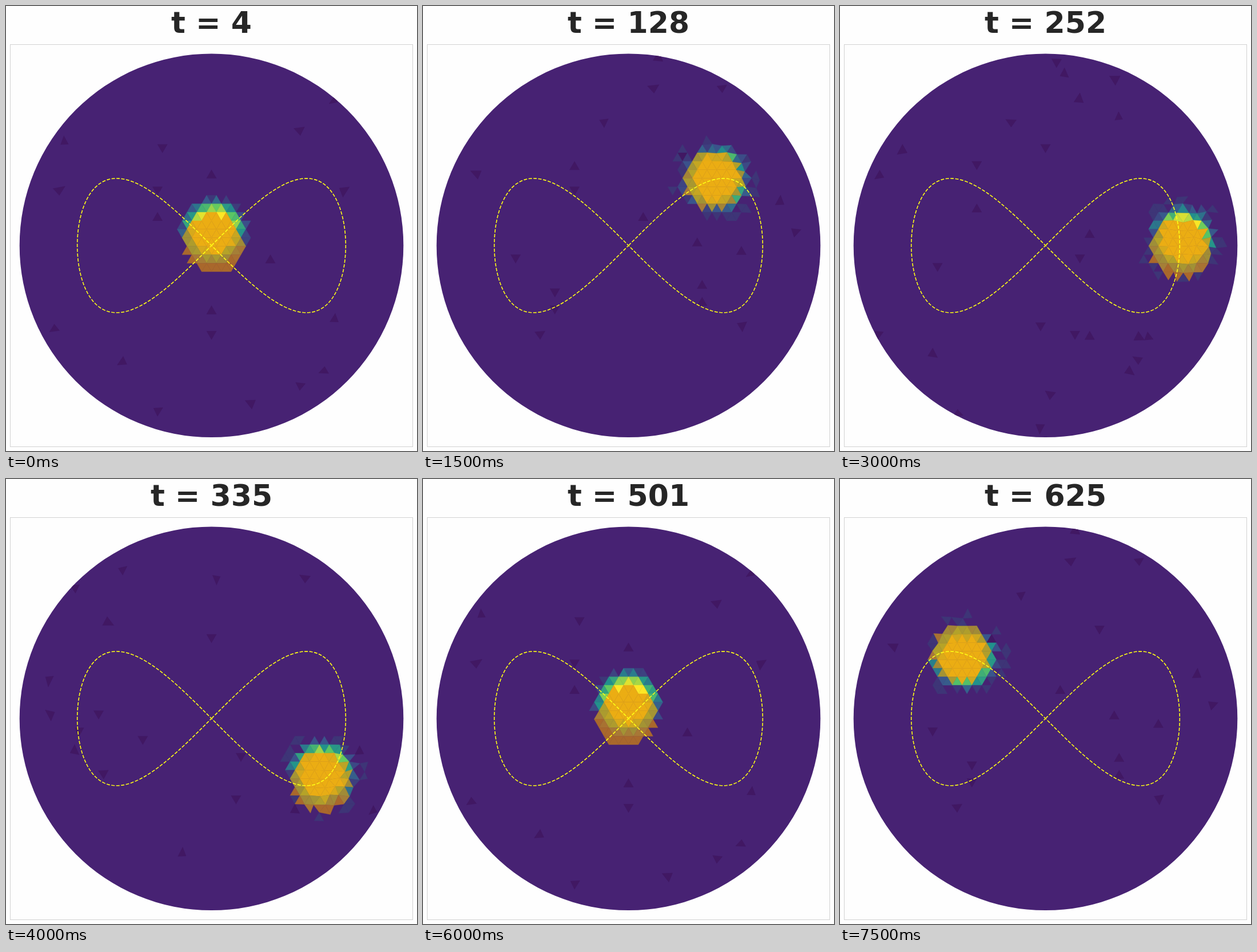
Recreate the animation shown at these times as an HTML page with a canvas. Size 719 by 779 pixels, loop 8 s.

```html
<!DOCTYPE html>
<html lang="en">
<head>
<meta charset="utf-8">
<title>Field on a disc</title>
<style>
  html, body { margin: 0; width: 100%; height: 100%; overflow: hidden; background: #fefefe; }
  canvas { position: absolute; left: 0; top: 0; }
  #label {
    position: absolute; left: 0; top: 3px; width: 719px; text-align: center;
    font: bold 52px/52px "DejaVu Sans", sans-serif; color: #262626; white-space: pre;
  }
</style>
</head>
<body>
<canvas id="stage" width="719" height="779"></canvas>
<div id="label"></div>
<script>
const ctx = document.getElementById("stage").getContext("2d");
const label = document.getElementById("label");

const CX = 359.5, CY = 419.3, RADIUS = 335.8;
const SIDE = 17.17, ROW = 14.86;
const STEP = 500, COUNT = 16, LAP = 994, REPEAT = 12;
const BASE = 0.1, DARK = 0.07, FAINT = 0.16;
const COVER = [226, 142, 10], COVER_ALPHA = 0.65, COVER_R = 51;
const VIRIDIS = [
  [68, 1, 84], [59, 82, 139], [33, 145, 140], [94, 201, 98], [253, 231, 37]
];

// Error of the estimated bump: step, dx, dy
const DRIFT = [
  [0, 1, -22], [3, 5, -2], [6, 5, -16], [8, 1, -13], [10, -4, 26], [12, 1, -25], [15, 4, 8]
];

function rand(a, b, c) {
  const s = Math.sin(a * 12.9898 + b * 78.233 + c * 37.719) * 43758.5453;
  return s - Math.floor(s);
}

function vertex(i, j) {
  const x = CX + SIDE * (i + (j & 1 ? 0 : 0.5));
  const y = 420.5 + ROW * j;
  const wobble = 5 * Math.min(1, Math.max(0, (Math.hypot(x - CX, y - CY) - 205) / 40));
  return [x + wobble * (rand(i, j, 1) - 0.5), y + wobble * (rand(i, j, 2) - 0.3)];
}

function cell(...pts) {
  const mean = m => (pts[0][m] + pts[1][m] + pts[2][m]) / 3;
  return { pts, x: mean(0), y: mean(1) };
}

function buildMesh() {
  const cells = [];
  for (let j = -24; j < 24; j++) {
    const o = j & 1 ? 0 : 1;
    for (let i = -21; i < 21; i++) {
      cells.push(cell(vertex(i, j), vertex(i + 1, j), vertex(i + o, j + 1)));
      cells.push(cell(vertex(i, j), vertex(i + o - 1, j + 1), vertex(i + o, j + 1)));
    }
  }
  return cells.filter(c => Math.hypot(c.x - CX, c.y - CY) < RADIUS);
}

const mesh = buildMesh();

function curve(a) {
  return [CX + 234.8 * Math.sin(a), CY - 117.5 * Math.sin(2 * a)];
}

function tick(k) {
  return Math.round(4 + 41.4 * k);
}

// Near-constant speed along the figure eight
function center(k) {
  const a = 2 * Math.PI * tick(k) / LAP;
  return curve(a - 0.135 * Math.sin(2 * a) - 0.065 * Math.sin(4 * a));
}

function drift(k) {
  const n = Math.max(1, DRIFT.findIndex(d => d[0] >= k));
  const [k0, x0, y0] = DRIFT[n - 1], [k1, x1, y1] = DRIFT[n];
  const u = (k - k0) / (k1 - k0);
  return [x0 + (x1 - x0) * u, y0 + (y1 - y0) * u];
}

function viridis(v) {
  const p = Math.min(0.9999, Math.max(0, v)) * (VIRIDIS.length - 1);
  const n = Math.floor(p);
  return VIRIDIS[n].map((c, m) => c + (VIRIDIS[n + 1][m] - c) * (p - n));
}

// Bump with a flat top and a ragged rim, over a floor with a few stray cells
function value(c, n, k, x, y) {
  const seed = k % REPEAT;
  const d = Math.hypot(c.x - x, c.y - y);
  const outer = Math.hypot(x - CX, y - CY) > 120;
  const v = (60.5 - d) / 25 + (rand(n, seed, 3) - 0.5) * (outer ? 0.34 : 0.16);
  if (v > 0.06) return BASE + 0.9 * Math.min(1, v);
  const stray = rand(n, seed, 4);
  if (outer && d < 78 && stray < 0.25) return FAINT;
  return stray > 0.993 ? DARK : BASE;
}

function paintCells(k) {
  const [x, y] = center(k), [dx, dy] = drift(k);
  mesh.forEach((c, n) => {
    const v = value(c, n, k, x + dx, y + dy);
    const covered = Math.hypot(c.x - x, c.y - y) < COVER_R;
    if (!covered && v === BASE) return;
    let rgb = viridis(v);
    if (covered) rgb = rgb.map((p, m) => p + (COVER[m] - p) * COVER_ALPHA);
    ctx.fillStyle = ctx.strokeStyle = `rgb(${rgb.map(Math.round).join(",")})`;
    ctx.beginPath();
    c.pts.forEach(p => ctx.lineTo(p[0], p[1]));
    ctx.closePath();
    ctx.fill();
    ctx.stroke();
  });
}

function paintCurve() {
  ctx.beginPath();
  for (let n = 0; n <= 400; n++) ctx.lineTo(...curve(n * Math.PI / 200));
  ctx.setLineDash([5.9, 2.6]);
  ctx.lineWidth = 1.6;
  ctx.strokeStyle = "#ffff14";
  ctx.stroke();
  ctx.setLineDash([]);
}

function paint(k) {
  ctx.fillStyle = "#fefefe";
  ctx.fillRect(0, 0, 719, 779);
  ctx.lineWidth = 1;
  ctx.strokeStyle = "#d2d2d2";
  ctx.strokeRect(7.5, 67.5, 704, 704);

  ctx.save();
  ctx.beginPath();
  ctx.arc(CX, CY, RADIUS, 0, 2 * Math.PI);
  ctx.fillStyle = "#472273";
  ctx.fill();
  ctx.clip();
  ctx.lineWidth = 0.4;
  paintCells(k);
  ctx.restore();

  paintCurve();
  label.textContent = "t = " + tick(k);
}

let shown = -1;
const start = performance.now();

function loop(now) {
  const k = Math.floor(Math.max(0, now - start) / STEP) % COUNT;
  if (k !== shown) paint(shown = k);
  requestAnimationFrame(loop);
}

loop(start);
</script>
</body>
</html>
```
